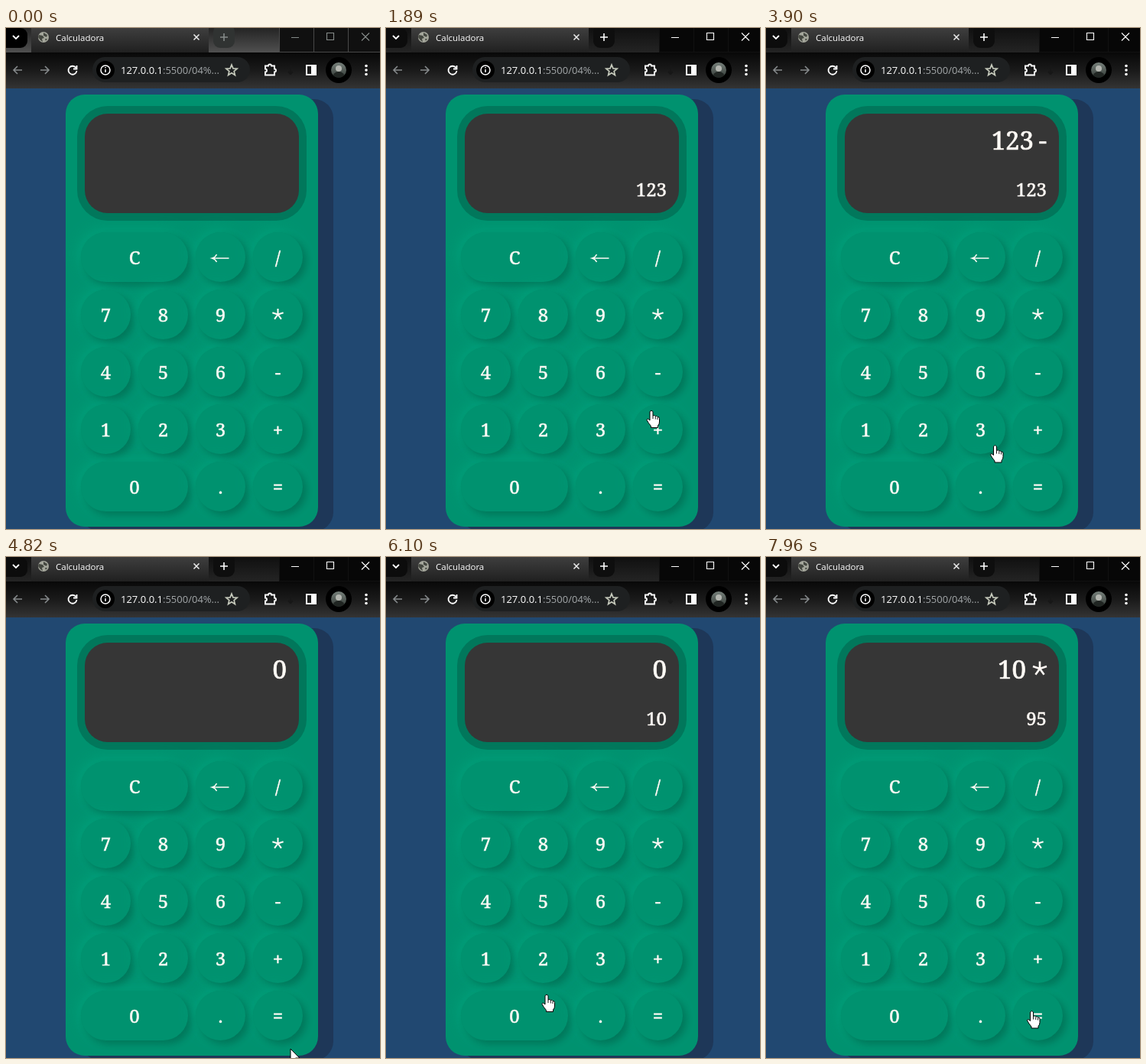
An HTML page with a canvas that plays this animation: 489 by 655 pixels, repeating every 8 s.

```html
<!DOCTYPE html>
<html lang="pt">
<head>
<meta charset="utf-8">
<title>Calculadora</title>
<style>
html, body { margin: 0; width: 100%; height: 100%; overflow: hidden; background: #214871; }
canvas { display: block; }
</style>
</head>
<body>
<canvas id="stage" width="489" height="655"></canvas>
<script>
const W = 489, H = 655, LOOP = 8000, STEP = 80;
const GREEN = '#00926f', WHITE = '#fffaf5';
const SERIF = '"Noto Serif", "DejaVu Serif", serif';
const SANS = '"Open Sans", "Noto Sans", sans-serif';
const screen = document.getElementById('stage').getContext('2d');
let g = screen;

// Pointer trips: destination, start, end. A key is pressed when the pointer leaves it.
const ENTRY = [488, 650];
const TRIPS = [
  [[460, 407], 120, 260], ['1', 420, 740], ['2', 980, 1480], ['3', 1600, 1730],
  [[347, 500], 1800, 1880], ['-', 1970, 2210], ['1', 2700, 3100], ['2', 3180, 3500],
  ['3', 3660, 3820], ['=', 3900, 4220], [[372, 643], 4490, 4650], ['1', 4900, 5540],
  ['0', 5700, 5860], [[210, 572], 5940, 6100], ['*', 6180, 6420], [[239, 437], 6580, 6980],
  ['9', 7060, 7140], ['5', 7220, 7380], ['=', 7460, 7940]
];
const FOCUS_TIME = 900;

const ROWS = ['C ←/', '789*', '456-', '123+', '0 .='];
const KEYS = [];
ROWS.forEach((row, r) => [...row].forEach((label, c) => {
  if (label === ' ') return;
  const w = row[c + 1] === ' ' ? 140 : 65, x = 98 + 75 * c, y = 267 + 75 * r;
  KEYS.push({ label, x, y, w, cx: x + w / 2, cy: y + 32.5 });
}));

function box(x, y, w, h, r, fill) {
  g.beginPath();
  g.roundRect(x, y, w, h, r);
  g.fillStyle = fill;
  g.fill();
}

function disc(x, y, r, fill) {
  g.beginPath();
  g.arc(x, y, r, 0, 7);
  g.fillStyle = fill;
  g.fill();
}

function stroke(d, color, width = 1.6) {
  g.strokeStyle = color;
  g.lineWidth = width;
  g.stroke(new Path2D(d));
}

function text(s, x, y, font, color, align = 'left') {
  g.font = font;
  g.fillStyle = color;
  g.textAlign = align;
  g.fillText(s, x, y);
}

// Serif text thickened to a medium weight
function digits(s, x, y, size, align) {
  text(s, x, y, `500 ${size}px ${SERIF}`, WHITE, align);
  g.strokeStyle = WHITE;
  g.lineWidth = size / 45;
  g.strokeText(s, x, y);
}

function asterisk(x, y, r) {
  g.beginPath();
  for (let i = 0; i < 5; i++) {
    const a = i * Math.PI * 0.4 - Math.PI / 2;
    g.moveTo(x, y);
    g.lineTo(x + r * Math.cos(a), y + r * Math.sin(a));
  }
  g.strokeStyle = WHITE;
  g.lineWidth = r / 3.6;
  g.stroke();
}

function fade(y0, y1, ...colors) {
  const f = g.createLinearGradient(0, y0, 0, y1);
  colors.forEach((c, i) => f.addColorStop(i / (colors.length - 1), c));
  return f;
}

function drawTabs(active) {
  const ink = active ? '#fff' : '#858b89';
  g.fillStyle = active ? fade(0, 32, '#101010', '#242424') : fade(0, 32, '#242424', '#505050');
  g.fillRect(0, 0, W, 32);
  box(-8, 0, 36, 26, 9, active ? '#0c0c0c' : '#000');
  stroke('M9 10l4 4 4-4', '#fff', 1.8);

  g.fillStyle = fade(0, 32, '#3e3e3e', '#202020');
  g.beginPath();
  g.roundRect(33, -2, 232, 34, [0, 0, 8, 8]);
  g.rect(33, 22, 232, 10);
  g.fill();

  disc(49, 12, 7, '#a5a79c');
  g.fillStyle = '#444740';
  g.fill(new Path2D('M43 9l5 1 2 3-3 1 1 4-3-2-3-4zM49 6l5 3-1 3-4-2zM51 14l3 0-2 3z'));
  text('Calculadora', 65, 16.5, '11.5px ' + SANS, '#fff');
  stroke('M245.5 8.5l7 7m0-7l-7 7', '#eee', 1.5);
  box(271, -4, 28, 30, 9, active ? '#0e0e0e' : '#303332');
  stroke('M280 12h10m-5-5v10', ink, 1.6);

  g.fillStyle = active ? '#070707' : '#101010';
  g.fillRect(357, 0, 132, 31);
  stroke('M357.5 0v31M402.5 0v31M447.5 0v31M357 31.5h132', active ? '#111' : '#484848', 1);
  stroke('M373 12.5h10M419.5 6.5h9v9h-9zM465 6.5l10 10m0-10l-10 10', ink, 1.1);
}

function drawToolbar() {
  g.fillStyle = fade(32, 79, '#080808', '#1a1a1a', '#343434');
  g.fillRect(0, 32, W, 47);
  stroke('M21 55H10m5-5l-5 5 5 5M45 55h11m-5-5l5 5-5 5', '#85898b', 1.6);
  stroke('M91.5 52A5.5 5.5 0 1 0 92.5 56M92.5 49v4.5H88', '#fff', 1.8);

  box(113, 38, 206, 33, 16.5, '#1e2021');
  disc(130, 55, 12, '#000');
  stroke('M124 55a6 6 0 1 0 12 0a6 6 0 1 0-12 0M130 54v4M130 51v1.6', '#fff', 1.5);
  const font = '13px ' + SANS;
  text('127.0.0.1', 150, 59.5, font, '#fff');
  text(':5500/04%...', 150 + g.measureText('127.0.0.1').width, 59.5, font, '#a4a8aa');

  g.beginPath();
  for (let i = 0; i < 10; i++) {
    const a = i * Math.PI / 5 - Math.PI / 2, r = i % 2 ? 3.3 : 7.5;
    g.lineTo(295 + r * Math.cos(a), 55.5 + r * Math.sin(a));
  }
  g.closePath();
  g.strokeStyle = '#c4c8ba';
  g.lineWidth = 1.7;
  g.stroke();

  stroke('M339 49.5h4a2 2 0 0 1 4 0h4v4a2 2 0 0 1 0 4v4h-12v-4a2 2 0 0 0 0-4z', '#fff', 1.9);
  stroke('M372 49v11m-3-3l3 3 3-3', '#171717', 2);
  stroke('M393 49h12v12h-12z', '#fff', 2);
  g.fillStyle = '#fff';
  g.fillRect(399, 49, 6, 12);

  disc(435, 55, 17, '#000');
  g.save();
  g.beginPath();
  g.arc(435, 55, 10, 0, 7);
  g.clip();
  g.fillStyle = fade(45, 65, '#77817b', '#343b37');
  g.fillRect(424, 44, 22, 22);
  disc(435, 53, 4, '#b3b5af');
  disc(435, 65, 8, '#202522');
  g.restore();
  [49.5, 55, 60.5].forEach(y => disc(471, y, 1.8, '#fff'));
}

function drawLabel({ label, cx, cy }) {
  if (label === '←') {
    stroke(`M${cx + 11} ${cy + 1.5}h-22m6-5q-2 4-6 5q4 1 6 5`, WHITE, 1.5);
  } else if (label === '*') {
    asterisk(cx, cy, 7.5);
  } else {
    digits(label, cx, cy + 9, 24, 'center');
  }
}

function drawCalculator() {
  g.fillStyle = '#214871';
  g.fillRect(0, 79, W, H);
  box(98, 93, 330, 565, 25, '#1e3758');
  box(78, 87, 330, 565, 25, GREEN);
  box(93, 102, 300, 150, 40, '#01775b');
  box(103, 112, 280, 130, 30, '#363636');

  const shades = [[-5, 'rgba(0,172,130,.4)', 15], [5, 'rgba(0,50,38,.3)', 10]];
  for (const k of KEYS) {
    g.save();
    for (const [d, color, blur] of shades) {
      g.shadowOffsetX = g.shadowOffsetY = d;
      g.shadowColor = color;
      g.shadowBlur = blur;
      box(k.x, k.y, k.w, 65, 32.5, GREEN);
    }
    g.restore();
  }
  KEYS.forEach(drawLabel);
}

function prepare(active) {
  const layer = document.createElement('canvas');
  layer.width = W;
  layer.height = H;
  g = layer.getContext('2d');
  drawTabs(active);
  drawToolbar();
  drawCalculator();
  g = screen;
  return layer;
}

// Calculator state after every key pressed up to time t
function readoutAt(t) {
  let num = '', op = '', low = '';
  TRIPS.slice(0, -1).forEach(([key], i) => {
    if (typeof key !== 'string' || TRIPS[i + 1][1] > t) return;
    if (key === '=') {
      num = String(op === '-' ? num - low : num * low);
      op = low = '';
    } else if ('-*'.includes(key)) {
      [num, op, low] = [low, key, ''];
    } else {
      low += key;
    }
  });
  return { num, op, low };
}

function drawReadout({ num, op, low }) {
  let right = 367;
  if (op === '*') {
    asterisk(right - 9, 146, 9.5);
    right -= 27;
  } else if (op) {
    digits(op, right, 159, 33, 'right');
    right -= 17;
  }
  digits(num, right, 159, 33, 'right');
  digits(low, 367, 220, 24, 'right');
}

const ARROW = new Path2D('M0 0V16.5L3.8 13 6.4 19 9 17.9 6.5 12H11.8Z');
const HAND = new Path2D('M-2 1.5Q0-1.5 2 1.5V7Q4 5.5 5.3 7.5Q7 6.5 8 8.5Q10.5 8 10.5 10.5V15' +
  'Q10.5 18 8.5 20V22.5H-.5V20.5Q-4 16.5-6 12.5Q-5.5 9.5-2 13Z');

const overKey = (x, y) => KEYS.some(k => {
  const half = k.w / 2 - 32.5;
  return Math.hypot(Math.max(0, Math.abs(x - k.cx) - half), y - k.cy) < 32.5;
});

function drawPointer(x, y) {
  const hand = overKey(x, y), shape = hand ? HAND : ARROW;
  g.save();
  g.translate(x, y);
  g.fillStyle = '#fff';
  g.fill(shape);
  g.strokeStyle = '#000';
  g.lineWidth = 1;
  g.lineJoin = 'round';
  g.stroke(shape);
  if (hand) stroke('M2 7v4M5.3 8v3.5M8 9v3', '#000', 0.9);
  g.restore();
}

function spot(place) {
  if (typeof place !== 'string') return place;
  const k = KEYS.find(key => key.label === place);
  return [k.cx - 8, k.cy - 6];
}

const easeOut = k => 1 - (1 - k) ** 2;

// The pointer advances in steps, each held for STEP ms
function pointerAt(t) {
  let pos = ENTRY;
  for (const [place, start, end] of TRIPS) {
    if (t < start) break;
    const steps = Math.floor((t - start) / STEP) + 1;
    const k = easeOut(Math.min(1, steps * STEP / (end - start + STEP)));
    const goal = spot(place);
    pos = pos.map((v, i) => v + (goal[i] - v) * k);
  }
  return pos;
}

const idle = prepare(false), focused = prepare(true);

function draw(t) {
  g.drawImage(t < FOCUS_TIME ? idle : focused, 0, 0);
  drawReadout(readoutAt(t));
  if (t >= TRIPS[0][1]) drawPointer(...pointerAt(t));
}

let origin;
function tick(now) {
  origin ??= now;
  draw((now - origin) % LOOP);
  requestAnimationFrame(tick);
}
draw(0);
requestAnimationFrame(tick);
</script>
</body>
</html>
```
